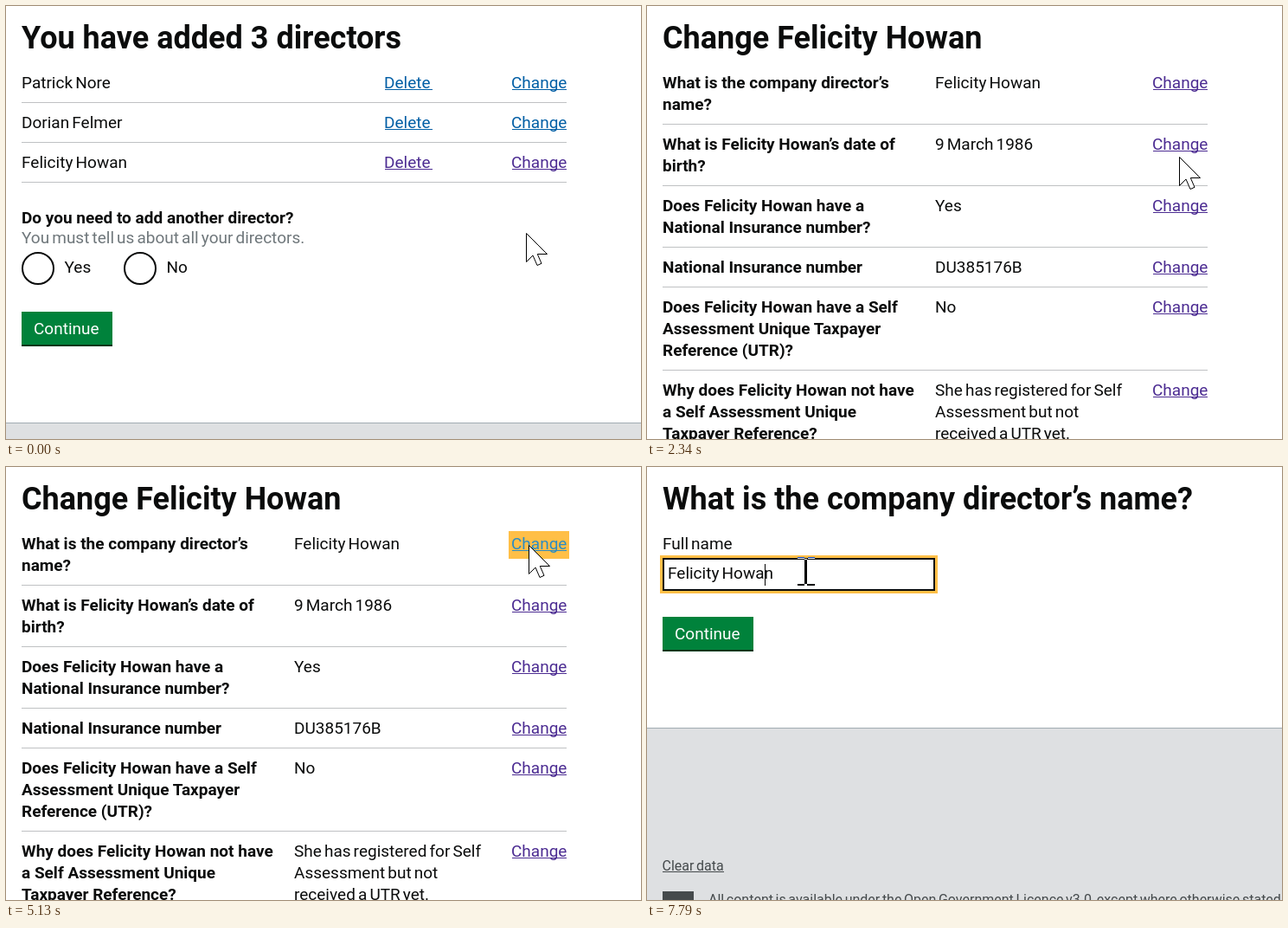
Recreate the animation shown at these times as an HTML page. Size 734 px wide and 500 px high, loop 8 s.

```html
<!DOCTYPE html>
<html lang="en">
<head>
<meta charset="utf-8">
<title>Change a director</title>
<style>
  html, body { margin: 0; width: 100%; height: 100%; overflow: hidden; background: #fff; }
  svg { display: block; width: 734px; height: 500px; }
  text { font: 19px Roboto, Arial, sans-serif; word-spacing: -.085em; fill: #0b0c0c; white-space: pre; }
  .h { font-size: 36px; font-weight: 700; word-spacing: 0; }
  .b { font-weight: 700; word-spacing: 0; }
  .hint { fill: #6f777b; }
  .btn { fill: #fff; }
  .small { font-size: 16px; fill: #454a4c; }
  rect { shape-rendering: crispEdges; }
  .link, .link text { fill: #005ea5; }
  .visited, .visited text { fill: #4c2c92; }
  .hover, .hover text { fill: #2b8cc4; }
  .link .glow { fill: #ffbf47; visibility: hidden; }
  .focus .glow { visibility: inherit; }
  .off { visibility: hidden; }
  #arrow path, #hand path { fill: #fff; stroke: #000; stroke-linejoin: round; }
  #hand path { stroke-width: 1.1; stroke-linecap: round; }
  #beam { mix-blend-mode: difference; }
</style>
</head>
<body>
<svg id="stage" viewBox="0 0 734 500"></svg>
<script>
const LOOP = 8000;
const person = 'Felicity Howan';

const text = (x, y, s, cls = '') => `<text x="${x}" y="${y}" class="${cls}">${s}</text>`;
const box = (x, y, w, h, fill) => `<rect x="${x}" y="${y}" width="${w}" height="${h}" fill="${fill}"/>`;
const lines = (x, y, list, cls) => list.map((s, i) => text(x, y + 25 * i, s, cls)).join('');
const rule = y => box(18, y, 630, 1, '#bfc1c3');
const radio = (x, label) =>
  `<circle cx="${x}" cy="303" r="18" fill="#fff" stroke="#0b0c0c" stroke-width="2"/>` + text(x + 30.5, 308, label);
const button = y =>
  box(18, y, 105, 38, '#00823b') + box(18, y + 38, 105, 2, '#003618') + text(32, y + 26, 'Continue', 'btn');
const footer = y => box(0, y, 734, 500 - y, '#dee0e2') + box(0, y, 734, 1, '#a1acb2');

// y is the middle of the row
const link = (x, y, w, s, cls) => `<g class="link ${cls}" data-x="${x}" data-y="${y}" data-w="${w}">
  <rect class="glow" x="${x - 4}" y="${y - 15}" width="${w + 7}" height="32"/>
  ${text(x - 1, y + 6, s)}<rect x="${x}" y="${y + 7}" width="${w}" height="1"/></g>`;
const change = (y, cls) => link(585, y, 63, 'Change', cls);

const listRow = (name, i) => {
  const y = 89 + 46 * i, cls = i === 2 ? 'visited' : '';
  return text(18, y + 6, name) + link(438, y, 55, 'Delete', cls) + change(y, cls) + rule(y + 22);
};

const answer = ([y, question, reply, end]) =>
  lines(18, y + 6, question, 'b') + lines(333, y + 6, reply) + change(y, 'visited') + (end ? rule(end) : '');

const answers = [
  [89, ['What is the company director’s', 'name?'], [person], 136],
  [160, [`What is ${person}’s date of`, 'birth?'], ['9 March 1986'], 207],
  [231, [`Does ${person} have a`, 'National Insurance number?'], ['Yes'], 278],
  [302, ['National Insurance number'], ['DU385176B'], 324],
  [348, [`Does ${person} have a Self`, 'Assessment Unique Taxpayer', 'Reference (UTR)?'], ['No'], 420],
  [444, [`Why does ${person} not have`, 'a Self Assessment Unique', 'Taxpayer Reference?'],
    ['She has registered for Self', 'Assessment but not', 'received a UTR yet.']]
];

const listPage = text(18, 49, 'You have added 3 directors', 'h')
  + ['Patrick Nore', 'Dorian Felmer', person].map(listRow).join('')
  + text(18, 251, 'Do you need to add another director?', 'b')
  + text(18, 274, 'You must tell us about all your directors.', 'hint')
  + radio(37, 'Yes') + radio(155, 'No') + button(353) + footer(481);

const answerPage = text(18, 49, `Change ${person}`, 'h') + answers.map(answer).join('');

const namePage = text(18, 49, 'What is the company director’s name?', 'h')
  + text(18, 95, 'Full name')
  + `<g id="ring">${box(15, 102, 321, 44, '#ffbf47')}</g>`
  + box(18, 105, 315, 38, '#0b0c0c') + box(20, 107, 311, 34, '#fff')
  + text(24, 129, person)
  + `<rect id="caret" y="112" width="1" height="25"/>`
  + button(173) + footer(301)
  + text(17.5, 466, 'Clear data', 'small') + box(18, 467, 71, 1, '#454a4c')
  + box(18, 490, 36, 36, '#454a4c')
  + text(71, 505, 'All content is available under the Open Government Licence v3.0, except where otherwise stated', 'small');

const cursors = `
  <g id="arrow"><path d="M.5 .5V33.5L8 26L13 37.5L18 35.3L13.3 24.5H24.5Z"/></g>
  <g id="hand"><path d="M-2.7 27V3.5C-2.7 -.3 3.2 -.3 3.2 3.5V13C3.6 9.8 8.6 9.8 9 13.5C9.6 10.9 14.4 11.2 14.8 15
    C15.6 12.8 20.6 13.3 20.6 17V29C20.6 34 17.5 37 16.5 40C14.5 46.5 -.5 46.5 -3 41C-4.5 37 -9 31.5 -12 26.5
    C-14 22.5 -8.5 20.5 -6 23.5Z"/><path d="M3.2 13V20M9 14V20M14.8 15V20" fill="none"/></g>
  <g id="beam" fill="#fff"><rect x="-10" y="-17" width="8" height="2"/><rect x="2" y="-17" width="8" height="2"/>
    <rect x="-2" y="-15" width="3" height="29"/>
    <rect x="-10" y="14" width="8" height="2"/><rect x="1" y="14" width="9" height="2"/></g>`;

const $ = id => document.getElementById(id);
$('stage').innerHTML = box(0, 0, 734, 500, '#fff')
  + [listPage, answerPage, namePage].map(p => `<g class="page">${p}</g>`).join('') + cursors;

const pages = [...document.querySelectorAll('.page')];
const links = pages.map(p => [...p.querySelectorAll('.link')]);

// time, x, y of the pointer, held until the next entry
const moves = [
  [0, 601, 262],
  [70, 600, 240], [140, 596, 190], [220, 586, 130], [290, 567, 75], [370, 546, 46], [440, 531, 39],
  [520, 528, 62], [590, 541, 112], [660, 574, 154], [740, 604, 171], [810, 615, 174],
  [3250, 614, 174], [3330, 588, 166], [3410, 546, 146], [3490, 524, 118], [3570, 545, 97], [3660, 590, 90], [3760, 604, 90],
  [6300, 590, 95], [6390, 542, 108], [6470, 465, 119], [6550, 388, 125], [6630, 316, 126],
  [6700, 260, 125], [6780, 220, 123], [6850, 195, 122], [6930, 183, 121],
  [7310, 184, 121]
];

const within = (t, a, b) => t >= a && t < b;
const show = (el, on) => el.classList.toggle('off', !on);

function draw(t) {
  const page = t < 2340 ? 0 : t < 6220 ? 1 : 2;
  const [, x, y] = moves.findLast(m => m[0] <= t);
  pages.forEach((p, i) => show(p, i === page));

  const idle = within(t, 2340, 3250);
  const over = links[page].find(({ dataset: d }) =>
    !idle && x >= +d.x && x <= +d.x + +d.w && Math.abs(y - d.y) <= 16);
  const clicked = within(t, 1090, 2340) || within(t, 4500, 6220);
  links[page].forEach(l => {
    l.classList.toggle('hover', l === over);
    l.classList.toggle('focus', l === over && clicked);
  });

  const loading = within(t, 1550, 3250) || within(t, 5130, 6220);
  const inField = page === 2 && x < 333 && y > 105 && y < 143;
  const kind = inField ? 'beam' : over && !loading ? 'hand' : 'arrow';
  for (const id of ['arrow', 'hand', 'beam']) {
    show($(id), id === kind);
    $(id).setAttribute('transform', `translate(${x} ${y})`);
  }

  const typing = page === 2 && t >= 7080;
  $('ring').style.visibility = typing ? '' : 'hidden';
  $('caret').style.visibility = typing && !within(t, 7630, 7790) ? '' : 'hidden';
  $('caret').setAttribute('x', t < 7790 ? 146 : 136);
}

function tick() {
  draw(performance.now() % LOOP);
  requestAnimationFrame(tick);
}
tick();
</script>
</body>
</html>
```
